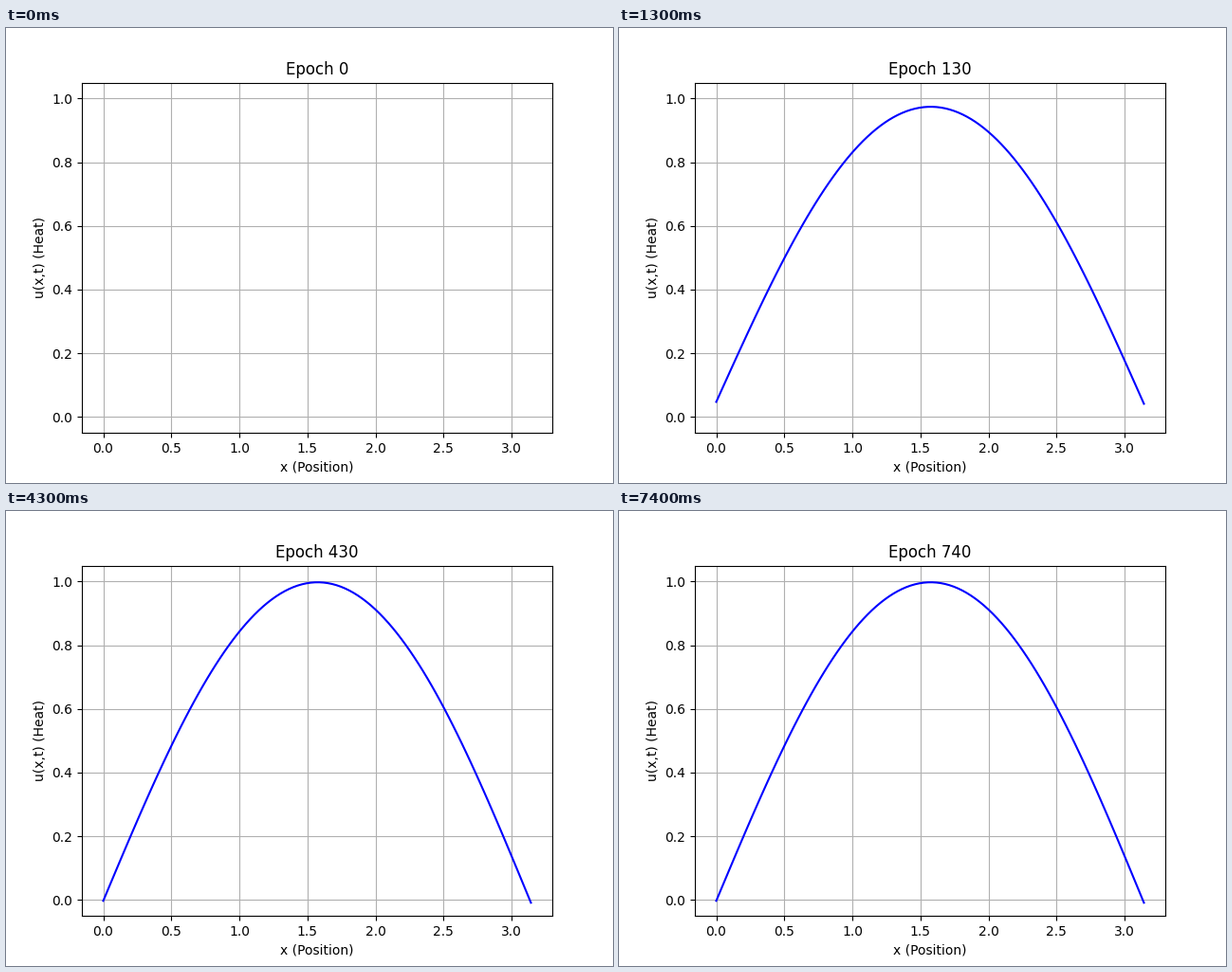
Animation, 640 px wide and 480 px high, one loop 7.5 s. Source, as a matplotlib script:

```python
import numpy as np
import matplotlib.pyplot as plt
from matplotlib.animation import FuncAnimation

FRAMES, INTERVAL, STEP = 75, 100, 10

x = np.linspace(0, np.pi, 100)


def decay(epoch, start, scale, power):
    return start * np.exp(-(epoch / scale) ** power)


def heat(epoch):
    """Network output as training pulls it towards sin(x)."""
    edge = decay(epoch, 0.4, 93.5, 2.22) - 0.0055
    peak = 0.9975 - decay(epoch, 0.3, 64.75, 1.34)
    tilt = 0.003 * (1 - 2 * x / np.pi)
    w2, w3 = 0.003, 0.006
    return (edge + tilt + (peak - edge + w3) * np.sin(x)
            - w2 * np.sin(2 * x) + w3 * np.sin(3 * x))


fig, ax = plt.subplots(figsize=(6.4, 4.8), dpi=100)
line, = ax.plot(x, np.sin(x), color="blue", lw=1.5)
# Keep the limits of the exact solution
ax.set_xlim(ax.get_xlim())
ax.set_ylim(ax.get_ylim())
ax.set_xlabel("x (Position)")
ax.set_ylabel("u(x,t) (Heat)")
ax.grid(True)
title = ax.set_title("Epoch 0")


def update(i):
    epoch = i * STEP
    title.set_text(f"Epoch {epoch}")
    if epoch:
        line.set_data(x, heat(epoch))
    else:
        line.set_data([], [])
    return line, title


anim = FuncAnimation(fig, update, frames=FRAMES, interval=INTERVAL,
                     repeat=True, repeat_delay=0, blit=False)
plt.show()
```
